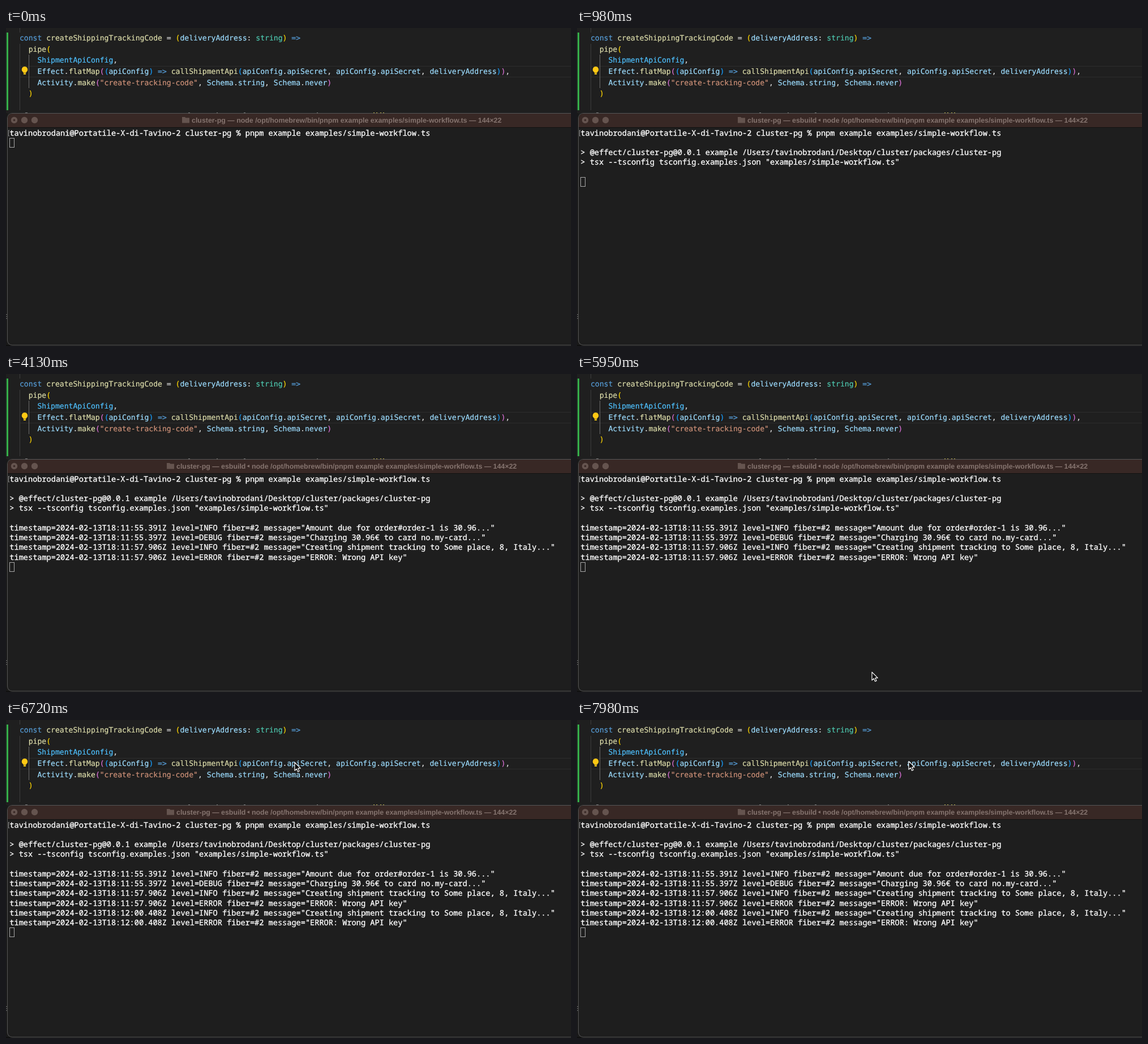
Animation, 998 px wide and 561 px high, one loop 8 s. Source, as an HTML page:

```html
<!DOCTYPE html>
<html lang="en">
<head>
<meta charset="utf-8">
<title>Terminal workflow</title>
<style>
  html, body { margin: 0; width: 100%; height: 100%; overflow: hidden; background: #1f1f1f; }
  svg { display: block; }
  text { white-space: pre; text-rendering: geometricPrecision; font-kerning: none; font-variant-ligatures: none; }
  .code { font: 13.08px "DejaVu Sans Mono", monospace; stroke-width: .2; }
  .term { font: 500 13.61px "Noto Sans Mono", monospace; fill: #fff; stroke: #fff; stroke-width: .35; }
  .title { font: bold 12.38px "Liberation Sans", sans-serif; fill: #85746f; }
</style>
</head>
<body>
<svg width="998" height="561" viewBox="0 0 998 561">
  <!-- editor -->
  <rect width="998" height="561" fill="#1f1f1f"/>
  <path d="M24 67.5H998M24 86.5H998" stroke="#2d2d2d"/>
  <path d="M24.5 0V8M24.5 28V145" stroke="#3c3c3c"/>
  <path d="M40.5 47V106" stroke="#6a6a6a"/>
  <rect x="1" y="8" width="3" height="137" fill="#35b04a"/>
  <g id="code"></g>
  <path d="M33 68a5.300 5.300 0 0 0-3 9.600l1 2h4l1-2a5.300 5.300 0 0 0-3-9.600zM31 80h4v2h-4z" fill="#ffc814"/>
  <path d="M34 149.500h4M322 149.500h3M372 149.500h2M420 149.500h3M549 149.500h2" stroke="#777"/>
  <path d="M649 149.500h2M654 149.500h2M661 149.500h2M666 149.500h2" stroke="#b9a94a"/>

  <!-- terminal window -->
  <rect y="150" width="3" height="411" fill="#191919"/>
  <rect y="559" width="998" height="2" fill="#101010"/>
  <path d="M0 505.500h1.500M0 509h1.500M0 512.500h1.500" stroke="#888"/>
  <path d="M998 150.500H11a8.500 8.500 0 0 0-8.500 8.500V551a8.500 8.500 0 0 0 8.500 8.500H998" fill="#1e1e1e" stroke="#565656"/>
  <path d="M998 151H11a8 8 0 0 0-8 8V175H998z" fill="#382825"/>
  <path d="M3 175.500H998" stroke="#111"/>
  <g fill="#65544f">
    <circle cx="14.500" cy="162.500" r="5.700"/>
    <circle cx="32.500" cy="162.500" r="5.700"/>
    <circle cx="50.500" cy="162.500" r="5.700"/>
  </g>
  <circle cx="14.500" cy="162.500" r="1.800" fill="#392926"/>
  <g id="titles"></g>
  <path d="M6 180.500H4.500V190.500H6" fill="none" stroke="#999"/>
  <g id="log"></g>
  <rect id="caret" x="6.500" width="8" height="16" fill="none" stroke="#a8a8a8"/>
  <path id="mouse" d="M0 0V14.200L3.300 11.200L5.600 16.300L8 15.200L5.700 10.200H10.200Z"
    fill="#000" stroke="#fff" stroke-width="1.200" stroke-linejoin="round"/>
</svg>
<script>
const LOOP = 8000, STEP = 70, ROW = 17.25;
const $ = id => document.getElementById(id);

function add(parent, tag, attrs, text = '') {
  const el = document.createElementNS('http://www.w3.org/2000/svg', tag);
  for (const key in attrs) el.setAttribute(key, attrs[key]);
  el.textContent = text;
  parent.append(el);
  return el;
}

// The first letter of each token picks its colour.
const colors = {
  k: '#569cd6', f: '#dcdcaa', v: '#9cdcfe', c: '#4fc1ff', t: '#4ec9b0',
  s: '#ce9178', w: '#d4d4d4', g: '#ffd700', p: '#da70d6', b: '#179fff'
};
const code = [
  ['kconst ', 'fcreateShippingTrackingCode', 'w = ', 'g(', 'vdeliveryAddress', 'w: ', 'tstring', 'g)', 'k =>'],
  ['f  pipe', 'g('],
  ['c    ShipmentApiConfig', 'w,'],
  ['v    Effect', 'w.', 'fflatMap', 'p(', 'b(', 'vapiConfig', 'b)', 'k => ', 'fcallShipmentApi', 'b(',
    'vapiConfig', 'w.', 'vapiSecret', 'w, ', 'vapiConfig', 'w.', 'vapiSecret', 'w, ', 'vdeliveryAddress', 'b)', 'p)', 'w,'],
  ['v    Activity', 'w.', 'fmake', 'p(', 's"create-tracking-code"', 'w, ', 'vSchema', 'w.', 'vstring', 'w, ',
    'vSchema', 'w.', 'vnever', 'p)'],
  ['g  )']
];
code.forEach((tokens, i) => {
  const line = add($('code'), 'text', { class: 'code', x: 24, y: 22.2 + 19.62 * i });
  for (const token of tokens) {
    const color = colors[token[0]];
    add(line, 'tspan', { fill: color, stroke: color }, token.slice(1));
  }
});

// Window titles
const command = 'node /opt/homebrew/bin/pnpm example examples/simple-workflow.ts — 144×22';
function makeTitle(x, head, commandX) {
  const g = add($('titles'), 'g', {});
  add(g, 'path', { d: `M${x - 17} 157h5l1.500 1.500h6.500v9h-13z`, fill: '#65544f' });
  add(g, 'text', { class: 'title', x, y: 166.5 }, head);
  add(g, 'text', { class: 'title', x: commandX, y: 166.5 }, command);
  return g;
}
const startTitle = makeTitle(328, 'cluster-pg — ', 407.2);
const buildTitle = makeTitle(301, 'cluster-pg — esbuild', 434);
add(buildTitle, 'path', { d: 'M430 160v5l-4.500-2.500z', fill: '#85746f' });

// Terminal output: [time shown, text]
const stamp = (time, level, message) =>
  `timestamp=2024-02-13T18:${time}Z level=${level} fiber=#2 message="${message}"`;
const shipping = 'Creating shipment tracking to Some place, 8, Italy...';
const wrongKey = 'ERROR: Wrong API key';
const lines = [
  [0, 'tavinobrodani@Portatile-X-di-Tavino-2 cluster-pg % pnpm example examples/simple-workflow.ts'],
  [700, ''],
  [700, '> @effect/cluster-pg@0.0.1 example /Users/tavinobrodani/Desktop/cluster/packages/cluster-pg'],
  [700, '> tsx --tsconfig tsconfig.examples.json "examples/simple-workflow.ts"'],
  [700, ''],
  [1610, stamp('11:55.391', 'INFO', 'Amount due for order#order-1 is 30.96...')],
  [1610, stamp('11:55.397', 'DEBUG', 'Charging 30.96€ to card no.my-card...')],
  [4130, stamp('11:57.906', 'INFO', shipping)],
  [4130, stamp('11:57.906', 'ERROR', wrongKey)],
  [6650, stamp('12:00.408', 'INFO', shipping)],
  [6650, stamp('12:00.408', 'ERROR', wrongKey)]
];
const rows = lines.map(([, text], i) =>
  add($('log'), 'text', { class: 'term', x: 6.3, y: 189.7 + ROW * i }, text));

// Pointer path: [time, x, y]
const path = [
  [5950, 521, 526], [6160, 562, 320], [6370, 570, 100], [6510, 570, 100],
  [6720, 510, 75], [6860, 500, 73], [7070, 500, 73], [7280, 439, 89],
  [7560, 439, 89], [7980, 586, 73]
];
function pointerAt(t) {
  const i = path.findIndex(p => p[0] >= t);
  if (i < 0) return path.at(-1).slice(1);
  if (i === 0) return path[0].slice(1);
  const [a, b] = [path[i - 1], path[i]];
  const u = (t - a[0]) / (b[0] - a[0]);
  return [1, 2].map(k => a[k] + (b[k] - a[k]) * u);
}

const show = (el, on) => el.setAttribute('visibility', on ? 'visible' : 'hidden');

function draw(now) {
  const t = Math.floor(now % LOOP / STEP) * STEP;
  show(startTitle, t < 980);
  show(buildTitle, t >= 980);
  rows.forEach((row, i) => show(row, t >= lines[i][0]));
  const count = lines.filter(line => t >= line[0]).length;
  $('caret').setAttribute('y', Math.round(176.6 + ROW * count) + 0.5);
  show($('mouse'), t >= path[0][0]);
  $('mouse').setAttribute('transform', `translate(${pointerAt(t)})`);
  requestAnimationFrame(draw);
}
draw(0);
</script>
</body>
</html>
```
